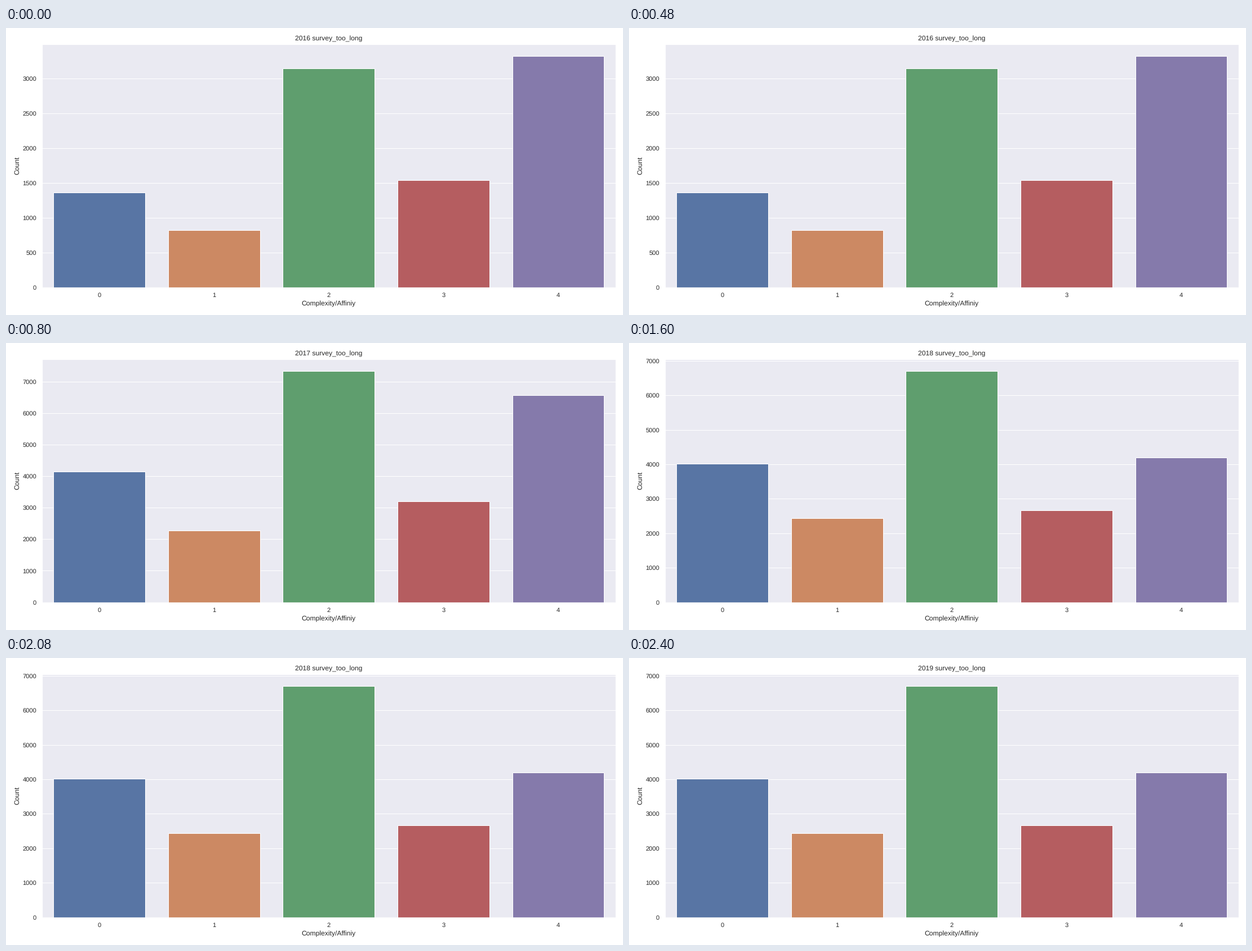
A matplotlib script that plays this animation: 1095x511 px, repeating every 3.2 s.

```python
import matplotlib.pyplot as plt
from matplotlib.animation import FuncAnimation

W, H, DPI = 1095, 511, 73
INK = "#262626"
COLORS = ["#5875a4", "#cc8963", "#5f9e6e", "#b55d60", "#857aab"]
COUNTS = {
    2016: [1363, 818, 3141, 1540, 3322],
    2017: [4138, 2281, 7340, 3193, 6566],
    2018: [4013, 2443, 6710, 2658, 4200],
    2019: [4013, 2443, 6710, 2658, 4200],
}
YEARS = list(COUNTS)

plt.rcParams.update({
    "font.family": "Liberation Sans",
    "text.color": INK,
    "text.hinting": "none",
    "axes.labelcolor": INK,
    "axes.facecolor": "#eaeaf2",
    "axes.edgecolor": "white",
    "axes.linewidth": 1.25,
    "axes.axisbelow": True,
})

fig = plt.figure(figsize=(W / DPI, H / DPI), dpi=DPI, facecolor="white")
left, right, top, bottom = 63.7, 1081.8, 29, 461.6
ax = fig.add_axes([left / W, 1 - bottom / H,
                   (right - left) / W, (bottom - top) / H])


def draw(i):
    year = YEARS[i % len(YEARS)]
    counts = COUNTS[year]
    ax.clear()
    ax.bar(range(5), counts, width=0.8, color=COLORS,
           edgecolor="white", linewidth=1)
    ax.set_xlim(-0.5, 4.5)
    ax.set_ylim(0, max(counts) * 1.05)
    ax.set_xticks(range(5))
    ax.grid(axis="y", color="white", linewidth=1)
    ax.tick_params(length=6, pad=3.5, left=False, bottom=False,
                   labelsize=11, labelcolor=INK)
    ax.set_title(f"{year} survey_too_long", fontsize=12, pad=6)
    ax.set_xlabel("Complexity/Affiniy", fontsize=12, labelpad=4)
    ax.set_ylabel("Count", fontsize=12, labelpad=4)
    return []


anim = FuncAnimation(fig, draw, frames=len(YEARS), interval=800,
                     init_func=lambda: draw(0), repeat=True, repeat_delay=0)
plt.show()
```
